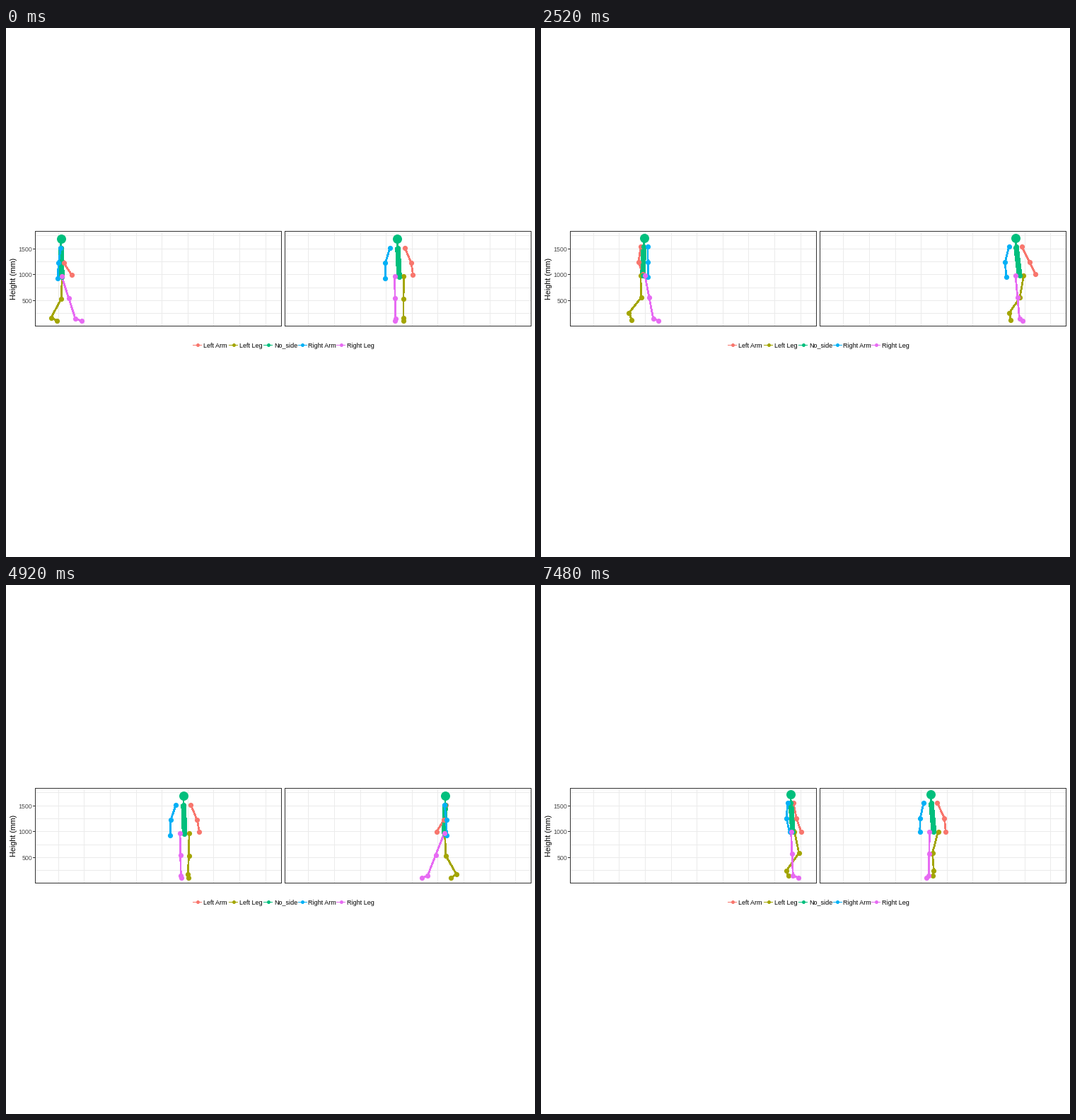
Animation, 748 px wide and 748 px high, one loop 7500 ms. Source, as a matplotlib script:

```python
import numpy as np
import matplotlib.pyplot as plt
from matplotlib.animation import FuncAnimation
from matplotlib.collections import LineCollection

SIZE, DPI, FRAMES, STEP = 748, 100, 375, 20
PX = 72 / DPI
GROUPS = [
    ("Left Arm", "#F8766D", 264.5),
    ("Left Leg", "#A3A500", 315.5),
    ("No_side", "#00BF7D", 364.5),
    ("Right Arm", "#00B0F6", 413),
    ("Right Leg", "#E76BF3", 467.5),
]
GREEN = GROUPS[2][1]


def spline(knots):
    """Cubic Hermite curve through (time, value) knots."""
    t, v = (np.array(c) for c in zip(*knots))
    m = np.gradient(v, t)

    def curve(x):
        i = np.clip(np.searchsorted(t, x) - 1, 0, len(t) - 2)
        d = t[i + 1] - t[i]
        u = (x - t[i]) / d
        return (v[i] * (1 + 2 * u) * (1 - u) ** 2 + d * m[i] * u * (1 - u) ** 2
                + v[i + 1] * u * u * (3 - 2 * u) + d * m[i + 1] * u * u * (u - 1))
    return curve


# Winding ground path of the hips as x + iy, and strides taken over time
path = spline([
    (-1, 9 + 553j), (0, 79 + 556j), (0.5, 97 + 558j), (1.04, 112 + 586j),
    (1.8, 121.5 + 638j), (2.5, 143 + 676j), (3.24, 193 + 690j), (3.82, 231 + 683j),
    (4.3, 245 + 656j), (4.92, 252.5 + 620j), (5.4, 256 + 588j), (5.9, 272 + 562j),
    (6.42, 302 + 552j), (7.48, 356 + 555.5j), (8.7, 412 + 515j)])
stride = spline([(-1, -0.83), (0, 0.01), (1.04, 0.78), (1.8, 1.5),
                 (4.92, 4.02), (7.48, 6.24), (8.7, 7.25)])
GRID_T = np.linspace(-1, 8.7, 1000)
GRID_STRIDE = stride(GRID_T)


def facing(t):
    """Unit vector the walker faces: slightly ahead along the path."""
    ahead = path(t + 0.2) - path(t)
    return ahead / abs(ahead)


def turn_rate(t):
    return np.angle(facing(t + 0.1) / facing(t - 0.1)) / 0.2


def bump(u, mid, width):
    d = (u - mid + 0.5) % 1 - 0.5
    return np.exp(-(d / width) ** 2)


def footprint(k, lag, side):
    t = np.interp(k + 0.3 - lag, GRID_STRIDE, GRID_T)
    return path(t) + 7j * side * facing(t)


def knee(fwd, drop, thigh=31.5, shin=30.5):
    """Knee position below the hip, bending forwards."""
    d = np.hypot(fwd, drop)
    a = (thigh ** 2 - shin ** 2 + d * d) / (2 * d)
    b = np.sqrt(max(thigh ** 2 - a * a, 0))
    return (a * fwd + b * drop) / d, (a * drop - b * fwd) / d


def arm(root, face, cycle, bob, lean, side):
    s = side * np.cos(2 * np.pi * cycle)
    fwd = np.array([-1, -1 + 3 * s, 4 + 9 * s])
    out = side * np.array([10.5, 18.5, 20]) + lean * np.array([1, 0.5, 0])
    height = np.array([309.5, 331, 351.5 - 0.3 * fwd[2]]) + bob
    return root + face * (fwd + 1j * out), height


def leg(root, face, cycle, bob, side):
    lag = 0.5 if side > 0 else 0
    k, u = divmod(cycle + lag, 1)
    s = np.clip((u - 0.6) / 0.4, 0, 1)
    s = s * s * (3 - 2 * s)
    ankle = footprint(k, lag, side) * (1 - s) + footprint(k + 1, lag, side) * s
    ankle_h = 411.3 - 10 * bump(u, 0.67, 0.12)
    hip, hip_h = root + 6.5j * side * face, 350 + bob
    local = (ankle - hip) / face
    fwd, drop = knee(local.real, ankle_h - hip_h)
    toe = ankle + face * (8.5 - 8 * bump(u, 0.69, 0.08))
    toe_h = 414 - 3 * bump(u, 0.71, 0.09)
    joints = np.array([hip, hip + face * (fwd + 0.5j * local.imag), ankle, toe])
    return joints, np.array([hip_h, hip_h + drop, ankle_h, toe_h])


def pose(t):
    """Ground positions and heights of the joints, one pair per group."""
    root, face, cycle = path(t), facing(t), stride(t)
    bob = 1.3 * np.cos(4 * np.pi * cycle)
    lean = 5 * turn_rate(t)
    body = root, face, cycle, bob
    top = face * (-1.3 + 1j * lean)
    spine = root + np.array([top, 0.8 * top, 0]), np.array([297, 309.5, 350.3]) + bob
    return [arm(*body, lean, 1), leg(*body, 1), spine,
            arm(*body, lean, -1), leg(*body, -1)]


plt.rcParams["font.family"] = "Liberation Sans"
plt.rcParams["path.snap"] = False
fig = plt.figure(figsize=(SIZE / DPI, SIZE / DPI), dpi=DPI, facecolor="white")
ax = fig.add_axes([0, 0, 1, 1])
ax.set(xlim=(0, SIZE), ylim=(SIZE, 0))
ax.axis("off")


def segments(lines, color, z=1):
    """Crisp one-pixel lines centred on whole pixels."""
    ax.add_collection(LineCollection(np.floor(lines) + 0.5, colors=color, zorder=z,
                                     linewidths=PX, antialiased=False,
                                     capstyle="projecting"))


TOP, BOTTOM, PANEL_W = 287, 421, 348
for left, first in ((41, 74.3), (394, 427.8)):
    right = left + PANEL_W
    segments([[(x, TOP), (x, BOTTOM)] for x in first + 36.6 * np.arange(9)], "#EBEBEB")
    segments([[(left, y), (right, y)] for y in 403.6 - 18.3 * np.arange(7)], "#EBEBEB")
    segments([[(x, TOP), (x, BOTTOM)] for x in (left, right)], "#333333", 9)
    segments([[(left, y), (right, y)] for y in (TOP, BOTTOM)], "#333333", 9)

for level in (500, 1000, 1500):
    y = 421.8 - 0.0732 * level
    segments([[(38, y), (40, y)]], "#333333")
    ax.text(37, y + 3.6, str(level), size=8.8 * PX, color="#4D4D4D", ha="right")
ax.text(10.7, 354, "Height (mm)", size=10.6 * PX, rotation=90, ha="center", va="center")

for name, color, x in GROUPS:
    segments([[(x, 448), (x + 12, 448)]], color)
    ax.plot(x + 6.5, 448.3, "o", color=color, ms=5 * PX, mew=0, aa=False)
    ax.text(x + 14.5, 451.5, name, size=9 * PX)


def stroke(color, width, z):
    return ax.plot([], [], color=color, lw=width * PX, aa=False, zorder=z,
                   solid_capstyle="butt", solid_joinstyle="round")[0]


def dots(color, size, z):
    return ax.plot([], [], "o", color=color, ms=size * PX, mew=0, aa=False, zorder=z)[0]


# Each artist shows some joints of one group in one of the two views
artists = []
for view in (np.real, np.imag):
    for n, (_, color, _) in enumerate(GROUPS):
        artists.append((stroke(color, 1.7, 3 + n / 10), view, n, slice(None)))
        artists.append((dots(color, 7.2, 4 + n / 10), view, n, slice(None)))
    artists.append((stroke(GREEN, 6.5, 3.25), view, 2, slice(1, 3)))
    artists.append((dots(GREEN, 13, 5), view, 2, slice(0, 1)))


def update(frame):
    groups = pose(frame * STEP / 1000)
    for artist, view, n, part in artists:
        ground, height = groups[n]
        artist.set_data(view(ground[part]), height[part])
    return [a[0] for a in artists]


anim = FuncAnimation(fig, update, frames=FRAMES, interval=STEP, repeat=True,
                     repeat_delay=0, blit=False)
plt.show()
```
